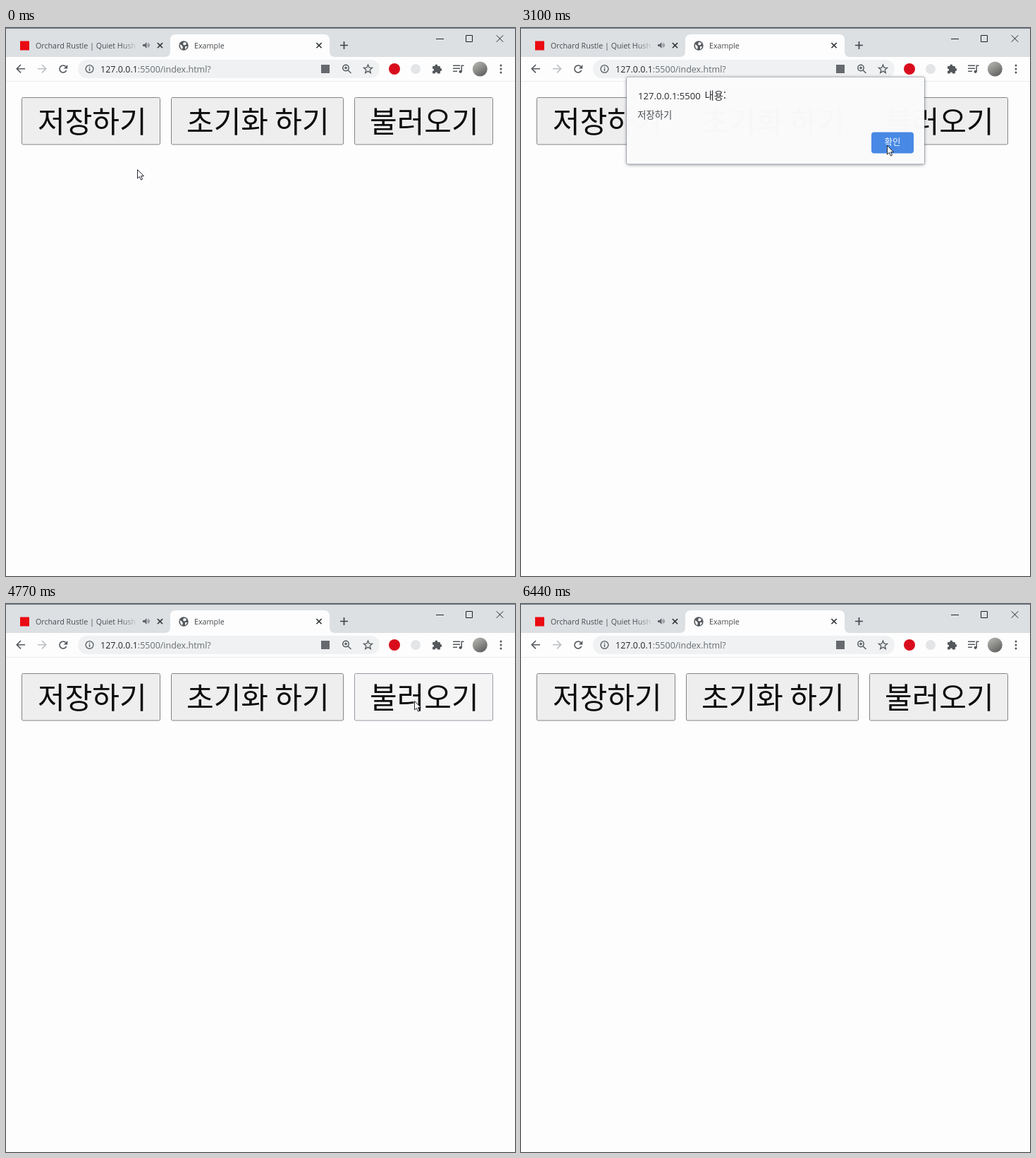
An HTML page with a canvas that plays this animation: 722x776 px, repeating every 6.48 s.

```html
<!DOCTYPE html>
<html lang="ko">
<head>
<meta charset="utf-8">
<style>
html, body { margin: 0; width: 722px; height: 776px; overflow: hidden; background: #fdfdfd; }
canvas { display: block; }
</style>
</head>
<body>
<canvas id="stage" width="722" height="776"></canvas>
<script>
const c = document.getElementById('stage').getContext('2d');
const LOOP = 6480;
const LATIN = '"Open Sans", "Noto Sans", sans-serif';
const HANGUL = '"Noto Sans CJK KR", "Noto Sans CJK", sans-serif';
const ICON = '#54585c';

const buttons = [
  { x: 22, w: 197, text: '저장하기', tx: 45 },
  { x: 234, w: 245, text: '초기화 하기', tx: 256 },
  { x: 494, w: 197, text: '불러오기', tx: 516 }
];
const dialogs = [
  { open: 1880, close: 3080, text: '저장하기' },
  { open: 3560, close: 4180, text: '초기화하기' },
  { open: 4840, close: 5370, text: '불러오기' }
];
// time, x, y of the pointer tip
const path = [
  [0, 187, 201], [450, 172, 217], [950, 226, 251], [1360, 146, 203],
  [1560, 128, 167], [1740, 124, 140], [1950, 124, 140], [2330, 250, 223],
  [2680, 440, 180], [2960, 520, 167], [3130, 520, 167], [3420, 410, 137],
  [3650, 410, 137], [3870, 472, 150], [4060, 528, 164], [4220, 528, 164],
  [4580, 580, 138], [4900, 580, 138], [5180, 545, 170], [5420, 545, 170],
  [6000, 575, 90], [6400, 610, -20]
];

const clamp = v => Math.max(0, Math.min(1, v));
const smooth = v => v * v * (3 - 2 * v);

function pointerAt(t) {
  const i = path.findIndex(p => p[0] > t);
  if (i < 0) return null;
  const a = path[i - 1], b = path[i];
  const k = smooth((t - a[0]) / (b[0] - a[0]));
  return [a[1] + (b[1] - a[1]) * k, a[2] + (b[2] - a[2]) * k];
}

function text(s, x, y, size, color, font, weight = 400) {
  c.font = `${weight} ${size}px ${font}`;
  c.fillStyle = color;
  c.fillText(s, x, y);
}
function box(x, y, w, h, r, fill, stroke) {
  c.beginPath();
  c.roundRect(x, y, w, h, r);
  if (fill) { c.fillStyle = fill; c.fill(); }
  if (stroke) { c.strokeStyle = stroke; c.lineWidth = 1; c.stroke(); }
}
function disc(x, y, r, fill) {
  c.beginPath();
  c.arc(x, y, r, 0, Math.PI * 2);
  c.fillStyle = fill;
  c.fill();
}
function ring(x, y, r, color, width, from = 0, to = Math.PI * 2) {
  c.beginPath();
  c.arc(x, y, r, from, to);
  c.strokeStyle = color;
  c.lineWidth = width;
  c.stroke();
}
function draw(d, color, width) {
  const p = new Path2D(d);
  if (width) { c.strokeStyle = color; c.lineWidth = width; c.stroke(p); }
  else { c.fillStyle = color; c.fill(p); }
}
function cross(x, y, r, color, width) {
  draw(`M${x - r} ${y - r}L${x + r} ${y + r}M${x + r} ${y - r}L${x - r} ${y + r}`, color, width);
}

function tabStrip() {
  c.fillStyle = '#dce0e3';
  c.fillRect(0, 0, 722, 41);
  c.fillStyle = '#66758a';
  c.fillRect(0, 0, 722, 1);
  draw('M225 41Q233 41 233 33V17Q233 9 241 9H451Q459 9 459 17V33Q459 41 467 41Z', '#fdfdfd');

  box(20, 18.5, 13, 13, 0, '#ea0a12');
  const fade = c.createLinearGradient(164, 0, 187, 0);
  fade.addColorStop(0, '#484c50');
  fade.addColorStop(1, 'rgba(72,76,80,0)');
  c.save();
  c.beginPath();
  c.rect(40, 10, 146, 28);
  c.clip();
  text('Orchard Rustle | Quiet Hush', 42, 29, 10.7, fade, LATIN);
  c.restore();

  draw('M194 23H196.5L199.5 20V29L196.5 26H194Z', '#62666a');
  ring(199.5, 24.5, 2, '#62666a', 1, -1, 1);
  ring(199.5, 24.5, 3.8, '#62666a', 1, -1, 1);
  cross(218.5, 24.7, 3.6, '#33373a', 1.6);

  disc(252, 25, 6.7, '#54585c');
  draw('M247 23L250 25L251 28L249.5 30Q246.5 28 247 23ZM252 20L256 21L255 24L252.5 24.5L251 23ZM254 26L257 26Q256.5 29 254 30Z', '#f6f7f7');
  text('Example', 267, 29, 10.7, '#45494d', LATIN);
  cross(444, 24.7, 3.6, '#33373a', 1.6);
  draw('M474 24.5H485M479.5 19V30', '#404448', 1.7);

  draw('M610 15.5H621', '#222', 1);
  box(652.5, 10.5, 9, 9, 0, null, '#222');
  cross(700.5, 15, 4.7, '#222', 1);
}

function toolbar() {
  c.fillStyle = '#fdfdfd';
  c.fillRect(0, 41, 722, 35);
  c.fillStyle = '#e9ebed';
  c.fillRect(0, 75, 722, 1);
  draw('M27 57.7H15.5M21 52L15.3 57.7L21 63.4', ICON, 1.6);
  draw('M45 57.7H56.5M51 52L56.7 57.7L51 63.4', '#bcbfc2', 1.6);
  ring(81, 58, 5, ICON, 1.6, 0.35, 5.5);
  draw('M87.3 52V57.5H81.8Z', ICON);

  box(102, 45, 428, 26, 13, '#eff1f2');
  ring(118.5, 58, 5.4, ICON, 1.3);
  draw('M118.5 57V61M118.5 54.7V56', ICON, 1.4);
  const host = '127.0.0.1';
  text(host, 134, 62.5, 12.5, '#26292c', LATIN);
  text(':5500/index.html?', 134 + c.measureText(host).width, 62.5, 12.5, '#686c70', LATIN);

  box(447, 52, 12, 12, 0, '#66696d');
  ring(482, 56.5, 4.2, ICON, 1.5);
  draw('M485 59.7L489.5 64M480 56.5H484M482 54.5V58.5', ICON, 1.4);
  let star = '';
  for (let i = 0; i < 10; i++) {
    const r = i % 2 ? 2.8 : 6.4, a = i * Math.PI / 5 - Math.PI / 2;
    star += `${i ? 'L' : 'M'}${513.5 + r * Math.cos(a)} ${58.3 + r * Math.sin(a)}`;
  }
  draw(star + 'Z', ICON, 1.3);

  disc(551, 58, 8, '#d80c1c');
  disc(581, 58, 7, '#e4e5e6');
  box(605, 54, 11, 10.5, 1, ICON);
  disc(610.3, 53.5, 2, ICON);
  disc(616.3, 59, 2, ICON);
  disc(605.3, 59.3, 1.7, '#fdfdfd');
  disc(610.3, 64.3, 1.7, '#fdfdfd');
  draw('M634 53.2H644M634 57.2H644M634 61.2H640M646.2 62V53.2H649.5', ICON, 1.5);
  disc(644.6, 61.8, 2.1, ICON);

  const tone = c.createLinearGradient(665, 48, 678, 68);
  tone.addColorStop(0, '#b5b5b2');
  tone.addColorStop(0.5, '#8c8c89');
  tone.addColorStop(1, '#5e5e5d');
  disc(672.3, 58, 10.5, tone);
  for (const y of [53, 58, 63]) disc(702, y, 1.5, ICON);
}

function pageButtons(t, pointer, modal) {
  for (const b of buttons) {
    const over = pointer && !modal && pointer[0] > b.x && pointer[0] < b.x + b.w &&
      pointer[1] > 98 && pointer[1] < 165;
    const down = over && dialogs.some(d => t >= d.open - 100 && t < d.open);
    const fill = down ? '#f4f4f4' : over ? '#e5e5e5' : '#eeeeee';
    const edge = down ? '#9a9aa8' : over ? '#626262' : '#858585';
    box(b.x + 0.5, 98.5, b.w - 1, 66.5, 2, fill, edge);
    text(b.text, b.tx, 148, 42, '#0c0c0c', HANGUL, 300);
  }
}

function dialog(d, t) {
  const enter = clamp((t - d.open) / 130);
  const leave = clamp((t - d.close) / 120);
  c.save();
  c.globalAlpha = enter * (1 - leave * leave);
  c.translate(0, -12 * (1 - smooth(enter)) - 12 * leave);
  c.save();
  c.shadowColor = 'rgba(40,45,60,.55)';
  c.shadowBlur = 5;
  c.shadowOffsetY = 1;
  box(150, 71.5, 422, 123, 2, '#fefefe');
  c.restore();
  box(149.5, 71.5, 423, 123.5, 2, null, 'rgba(110,115,130,.4)');
  text('127.0.0.1:5500', 166, 103, 13.1, '#202326', LATIN);
  text('내용:', 260.5, 103, 14.4, '#202326', HANGUL);
  text(d.text, 165.3, 130, 13.3, '#404347', HANGUL);
  if (!leave) box(496, 148.5, 62, 32, 5, '#a9c8f4');
  box(497, 149.5, 60, 30, 4, '#4386e5');
  text('확인', 515.5, 168, 12.4, '#fff', HANGUL);
  c.restore();
}

function arrow(x, y) {
  c.save();
  c.translate(Math.round(x) + 0.5, Math.round(y) + 0.5);
  c.lineJoin = 'round';
  const shape = 'M-1 -1V11.5L1.8 8.9L4 13.6L6 12.7L4 8.2H8Z';
  draw(shape, '#fff');
  draw(shape, '#26262e', 1);
  c.restore();
}

function frame(now) {
  const t = now % LOOP;
  const pointer = pointerAt(t);
  const modal = dialogs.find(d => t >= d.open && t < d.close + 120);
  c.fillStyle = '#fdfdfd';
  c.fillRect(0, 0, 722, 776);
  tabStrip();
  toolbar();
  pageButtons(t, pointer, modal);
  if (modal) dialog(modal, t);
  if (pointer) arrow(...pointer);
}

const start = performance.now();
function tick() {
  frame(performance.now() - start);
  requestAnimationFrame(tick);
}
tick();
</script>
</body>
</html>
```
